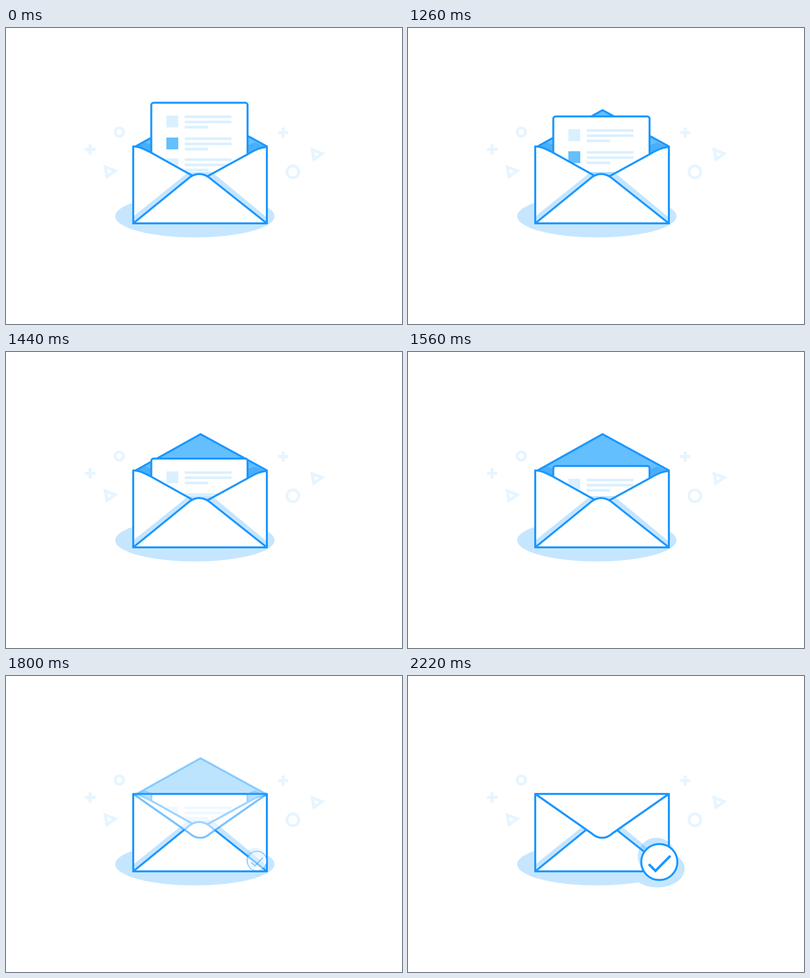
These frames come from a looping animation (800x600 px, 3060 ms). An HTML page with a canvas:

```html
<!DOCTYPE html>
<html lang="en">
<head>
<meta charset="utf-8">
<title>Envelope</title>
<style>
html, body { margin: 0; width: 100%; height: 100%; overflow: hidden; background: #fff; }
canvas { display: block; width: 800px; height: 600px; }
</style>
</head>
<body>
<canvas id="stage" width="800" height="600"></canvas>
<script>
const ctx = document.getElementById('stage').getContext('2d');
const LOOP = 3060, STEP = 60;
const BLUE = '#1a97ff', SKY = '#64bfff', DEEP = '#4aaef9';
const PALE = '#daf0ff', GROUND = '#c6e6ff', SHADE = 'rgba(26,151,255,.25)', DECOR = '#e6f5ff';

const clamp = v => Math.min(1, Math.max(0, v));
const span = (t, from, to) => clamp((t - from) / (to - from));

// Timing curve with flat ends; x1 and x2 are the handle positions.
function ease(x, x1, x2) {
  let lo = 0, hi = 1, s = x;
  for (let i = 0; i < 24; i++) {
    s = (lo + hi) / 2;
    const r = 1 - s;
    const px = 3 * r * r * s * x1 + 3 * r * s * s * x2 + s * s * s;
    if (px < x) lo = s; else hi = s;
  }
  return s * s * (3 - 2 * s);
}

function paint(path, fill, stroke, width = 4) {
  if (fill) { ctx.fillStyle = fill; ctx.fill(path); }
  if (stroke) { ctx.strokeStyle = stroke; ctx.lineWidth = width; ctx.stroke(path); }
}

function faded(alpha, draw) {
  if (alpha <= 0) return;
  ctx.save();
  ctx.globalAlpha = alpha;
  draw();
  ctx.restore();
}

function oval(x, y, rx, ry = rx) {
  const p = new Path2D();
  p.ellipse(x, y, rx, ry, 0, 0, Math.PI * 2);
  return p;
}

const inside = new Path2D('M257 240H527L393 305Z');
const backFlap = new Path2D('M262 240L393 166.5L527 240');
const corners = new Path2D('M262 240L281 232L294 237V254Z M524 241L503 232L490 237V256Z');
const pocket = new Path2D('M257 240C268 240 274 243 292 252L376 299L408 300L488 256C505 246 512 243 527 241V396H257Z');
const foldShade = new Path2D('M257 382L369 292H416L527 384V396H257Z');
const front = new Path2D('M257 396L372 302Q390 290 409 302L527 396Z');
const frontFlap = new Path2D('M257 239L371 319C384 331 400 331 413 319L527 239Z');
const topEdge = new Path2D('M257 239H527');
const tick = new Path2D('M486.5 381.5L500 395L530 364.5');
const triangle = new Path2D('M200.5 281.5L220.5 289.5L204 301Z');

function plus(x, y) {
  ctx.fillStyle = DECOR;
  ctx.fillRect(x - 10.5, y - 3, 21, 6);
  ctx.fillRect(x - 3, y - 10.5, 6, 21);
}

function decor() {
  plus(170, 246);
  plus(560, 212);
  paint(oval(229, 211, 8.5), null, DECOR, 5.5);
  paint(oval(579.5, 291.5, 12), null, DECOR, 5.5);
  ctx.save();
  ctx.lineJoin = 'miter';
  paint(triangle, null, DECOR, 6);
  ctx.translate(418, -35);
  paint(triangle, null, DECOR, 6);
  ctx.restore();
}

function letter(y) {
  const sheet = new Path2D();
  sheet.roundRect(293.5, y, 194.5, 170, 5);
  paint(sheet, '#fff', BLUE);
  [26, 70.5, 113].forEach((dy, i) => {
    ctx.fillStyle = i === 1 ? SKY : PALE;
    ctx.fillRect(324, y + dy, 24, 24);
    ctx.fillStyle = PALE;
    [94.5, 94.5, 47.5].forEach((w, k) => ctx.fillRect(361, y + dy - .2 + k * 10.5, w, 5.3));
  });
}

function badgeSpace(scale) {
  ctx.translate(506, 372.7);
  ctx.scale(scale, scale);
  ctx.translate(-506, -372.7);
}

function draw(t) {
  const top = 151.5 + 87.5 * ease(span(t, 1120, 1740), .13, .437);
  const closed = span(t, 1595, 1950);
  const edge = span(t, 1680, 1830);
  const size = 1 - Math.pow(1 - span(t, 1680, 2100), 2.3);
  const shown = span(t, 1680, 1950);

  ctx.fillStyle = '#fff';
  ctx.fillRect(0, 0, 800, 600);
  ctx.lineJoin = ctx.lineCap = 'round';

  decor();
  paint(oval(381.5, 381.5, 161, 43), GROUND);
  faded(shown, () => {
    badgeSpace(size);
    paint(oval(503.5, 391, 55.5, 37.5), GROUND);
  });

  paint(inside, SKY);
  faded(1 - closed, () => {
    paint(backFlap, SKY);
    paint(corners, DEEP);
    paint(backFlap, null, BLUE);
  });

  ctx.save();
  ctx.beginPath();
  ctx.rect(0, 0, 800, 320);
  ctx.clip();
  letter(top);
  ctx.restore();

  paint(pocket, '#fff');
  paint(foldShade, SHADE);
  paint(pocket, null, BLUE);
  paint(front, '#fff', BLUE);

  faded(closed, () => paint(frontFlap, '#fff', BLUE));
  faded(edge, () => paint(topEdge, null, BLUE));

  faded(shown, () => {
    badgeSpace(size);
    paint(oval(502, 365.5, 37.8), SHADE);
    paint(oval(507.7, 377, 36.5), '#fff', BLUE);
    ctx.lineJoin = 'miter';
    ctx.lineCap = 'butt';
    paint(tick, null, BLUE, 5);
  });
}

// The motion runs on a fixed beat.
function tickFrame() {
  const t = performance.now() % LOOP;
  draw(Math.floor(t / STEP) * STEP);
  requestAnimationFrame(tickFrame);
}
tickFrame();
</script>
</body>
</html>
```
